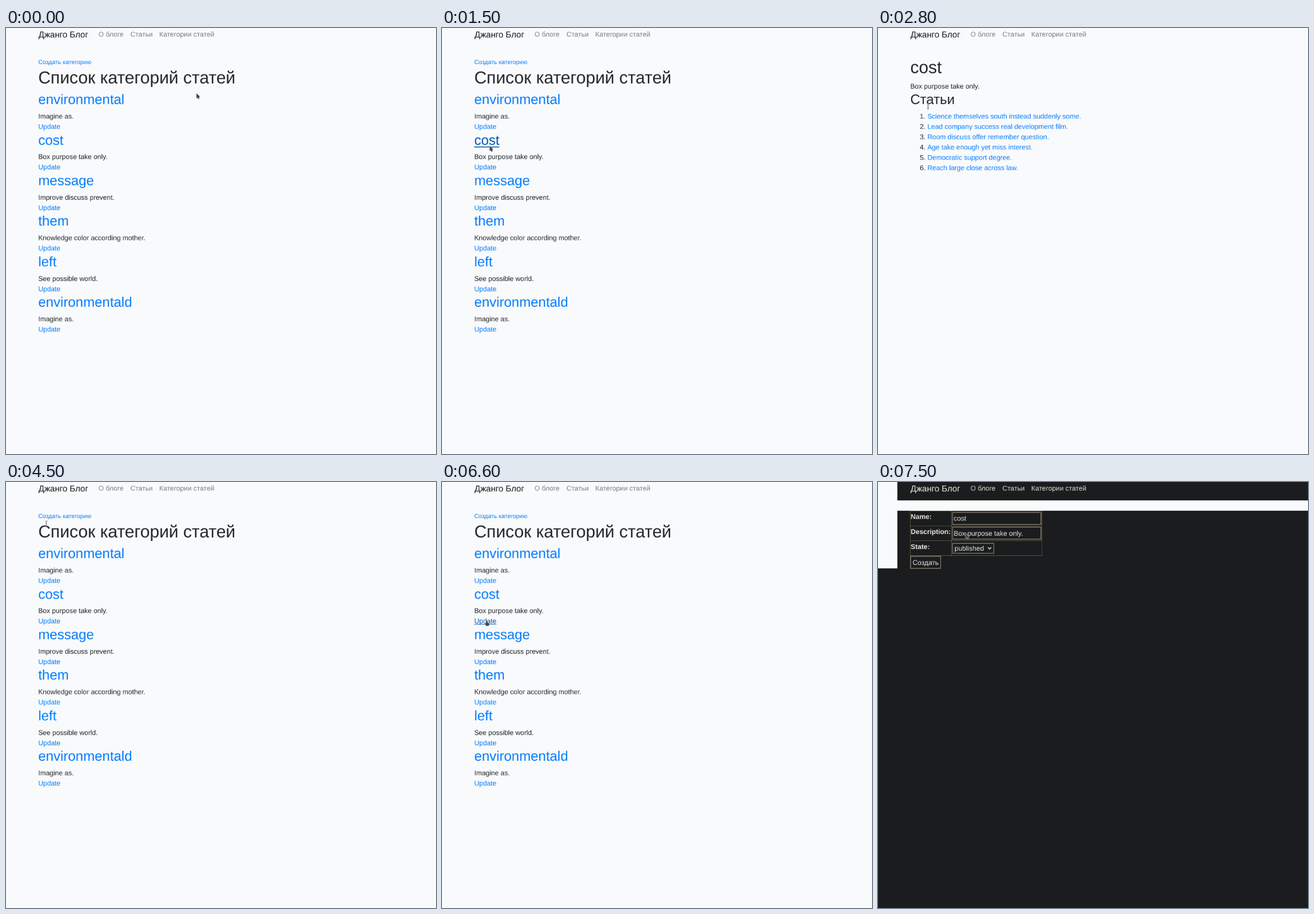
An HTML page with a canvas that plays this animation: 752x744 px, repeating every 8 s.

```html
<!DOCTYPE html>
<html lang="ru">
<head>
<meta charset="utf-8">
<title>Джанго Блог</title>
<style>
  html, body { margin: 0; width: 100%; height: 100%; overflow: hidden; background: #f9fafc; }
  canvas { display: block; }
</style>
</head>
<body>
<canvas id="stage" width="752" height="744"></canvas>
<script>
// The page is painted on a finer screen grid, then scaled down to the stage.
const SCALE = 4 / 3;
const stage = document.getElementById('stage').getContext('2d');
const screen = document.createElement('canvas');
screen.width = 1003;
screen.height = 992;
const ctx = screen.getContext('2d');

const LOOP = 8000;
const LIGHT = '#f9fafc', DARK = '#1a1c1d';
const INK = '#212529', LINK = '#007bff', HOVER = '#0056b3', PALE = '#e8e6e3';
const LEFT = 56.4, TOP = 50.25;

const categories = [
  ['environmental', 'Imagine as.'],
  ['cost', 'Box purpose take only.'],
  ['message', 'Improve discuss prevent.'],
  ['them', 'Knowledge color according mother.'],
  ['left', 'See possible world.'],
  ['environmentald', 'Imagine as.']
];
const articles = [
  'Science themselves south instead suddenly some.',
  'Lead company success real development film.',
  'Room discuss offer remember question.',
  'Age take enough yet miss interest.',
  'Democratic support degree.',
  'Reach large close across law.'
];

// start time, page, cursor, x, y, hovered link
const steps = [
  [0, 'list', 'arrow', 333.3, 114],
  [600, 'list', 'arrow', 170, 166],
  [700, 'list', 'hand', 85, 206.5, 'cost'],
  [1300, 'list', 'hand', 84.5, 206, 'cost'],
  [1400, 'list', 'arrow', 84, 206, 'cost'],
  [1500, 'list', 'arrow', 83.6, 206, 'cost'],
  [1800, 'detail', 'arrow', 83.6, 206],
  [2000, 'detail', 'beam', 87, 212],
  [2200, 'detail', 'beam', 87, 211],
  [2300, 'detail', 'beam', 87, 205],
  [2400, 'detail', 'hand', 87, 190, articles[2]],
  [2500, 'detail', 'beam', 87, 179],
  [2600, 'detail', 'beam', 87, 146],
  [2700, 'detail', 'beam', 87, 132],
  [2800, 'detail', 'beam', 87.5, 137],
  [4500, 'list', 'beam', 70.5, 73],
  [4900, 'list', 'arrow', 145.2, 178.5],
  [5300, 'list', 'beam', 88, 200.5],
  [5800, 'list', 'arrow', 70.4, 209.3],
  [6300, 'list', 'arrow', 77.5, 242, 'update'],
  [6600, 'list', 'hand', 77, 242, 'update'],
  [6900, 'form', 'arrow', 78, 242],
  [7500, 'form', 'arrow', 153.4, 89.3]
];

const snap = v => Math.round(v * SCALE) / SCALE;

function rect(x, y, w, h, color) {
  ctx.fillStyle = color;
  ctx.fillRect(snap(x), snap(y), snap(x + w) - snap(x), snap(h));
}

// Text placed by the middle of its line box; returns the baseline
function text(str, x, mid, size, color, weight = 'normal') {
  const base = snap(mid + size * 0.3465);
  ctx.font = `${weight} ${size}px "Liberation Sans", Arial, sans-serif`;
  ctx.fillStyle = color;
  ctx.fillText(str, x, base);
  return base;
}

function link(str, x, mid, size, hovered) {
  const base = text(str, x, mid, size, hovered ? HOVER : LINK);
  if (hovered) {
    rect(x, base + size * 0.115, ctx.measureText(str).width, size * 0.07, HOVER);
  }
}

function navbar(brand, item) {
  text('Джанго Блог', 56.9, 11.3, 15, brand);
  text('О блоге', 161.9, 11.1, 12, item);
  text('Статьи', 217.6, 11.1, 12, item);
  text('Категории статей', 268.2, 11.1, 12, item);
}

function lightPage() {
  rect(0, 0, 753, 744, LIGHT);
  navbar('#17181a', '#7d7d7e');
}

function listPage(hover) {
  lightPage();
  link('Создать категорию', LEFT, TOP + 9.2, 10.5, false);
  text('Список категорий статей', LEFT, TOP + 36, 30, INK);
  categories.forEach(([name, note], i) => {
    const y = TOP + 60 + i * 70.8;
    link(name, LEFT, y + 14.4, 24, hover === name);
    text(note, LEFT, y + 43.8, 12, INK);
    link('Update', LEFT, y + 61.8, 12, hover === 'update' && i === 1);
  });
}

function detailPage(hover) {
  lightPage();
  text('cost', LEFT, TOP + 18, 30, INK);
  text('Box purpose take only.', LEFT, TOP + 51, 12, INK);
  text('Статьи', LEFT, TOP + 74.4, 24, INK);
  articles.forEach((title, i) => {
    const y = TOP + 103.8 + i * 18;
    text(`${i + 1}.`, LEFT + 16.7, y, 12, INK);
    link(title, LEFT + 30, y, 12, hover === title);
  });
}

function field(x, y, w, h) {
  ctx.lineWidth = 1.5;
  ctx.strokeStyle = '#7d7466';
  ctx.strokeRect(snap(x) + 0.75, snap(y) + 0.75, snap(w) - 1.5, snap(h) - 1.5);
}

function formPage() {
  rect(0, 0, 753, 744, DARK);
  rect(0, 0, 34, 151, LIGHT);
  rect(34, 32, 719, 18, LIGHT);
  navbar(PALE, '#dcdad7');

  const grid = '#625e49';
  for (const y of [50.3, 76.3, 102.3, 128.3]) rect(56.2, y, 231, 0.75, grid);
  for (const x of [56.2, 128.2, 286.3]) rect(x, 50.3, 0.75, 78.5, grid);
  ['Name:', 'Description:', 'State:'].forEach((label, i) =>
    text(label, 57.2, 60.6 + i * 26, 12, PALE, 'bold'));

  field(129.5, 52.3, 156, 22.4);
  text('cost', 132.4, 63.6, 12, PALE);
  field(129.5, 78.3, 156, 22.4);
  text('Box purpose take only.', 132.4, 89.6, 12, PALE);
  field(129.7, 106.3, 73.8, 18.7);
  text('published', 133.9, 115.6, 12, PALE);
  ctx.beginPath();
  ctx.moveTo(192.2, 114.2);
  ctx.lineTo(195.2, 117.2);
  ctx.lineTo(198.2, 114.2);
  ctx.strokeStyle = PALE;
  ctx.lineWidth = 1.4;
  ctx.stroke();
  field(56.3, 129, 54.3, 22.3);
  text('Создать', 60.6, 140.3, 12, PALE);
}

const cursors = {
  arrow() {
    ctx.beginPath();
    ctx.moveTo(0, 0.3);
    ctx.lineTo(0, 8.6);
    ctx.lineTo(1.8, 7.6);
    ctx.lineTo(3.3, 10);
    ctx.lineTo(4.7, 9.2);
    ctx.lineTo(3.8, 6.8);
    ctx.lineTo(5.6, 5.9);
    ctx.closePath();
    ctx.strokeStyle = '#c4c4c4';
    ctx.lineWidth = 1.1;
    ctx.stroke();
    ctx.fillStyle = '#404143';
    ctx.fill();
  },
  hand() {
    ctx.beginPath();
    ctx.roundRect(0, 0, 2, 7, 1);
    ctx.roundRect(-0.8, 3.8, 6.2, 5.4, 1.6);
    ctx.moveTo(-2, 4.6);
    ctx.lineTo(0, 5);
    ctx.lineTo(1, 8.8);
    ctx.closePath();
    ctx.strokeStyle = '#d5d8dc';
    ctx.lineWidth = 0.8;
    ctx.stroke();
    ctx.fillStyle = '#434548';
    ctx.fill();
  },
  beam() {
    rect(-0.4, -4.5, 0.8, 9, '#77797c');
    rect(-2.3, -5, 4.6, 0.9, '#8b8d90');
    rect(-2.3, 4.1, 4.6, 0.9, '#8b8d90');
  }
};

const pages = { list: listPage, detail: detailPage, form: formPage };

function draw(now) {
  const t = now % LOOP;
  const [, page, cursor, x, y, hover] = steps.findLast(step => step[0] <= t);
  ctx.setTransform(SCALE, 0, 0, SCALE, 0, 0);
  ctx.textRendering = 'geometricPrecision';
  pages[page](hover);
  ctx.translate(x, y);
  cursors[cursor]();

  stage.imageSmoothingQuality = 'high';
  stage.drawImage(screen, 0, 0, screen.width / SCALE, screen.height / SCALE);
}

const start = performance.now();
function tick() {
  draw(performance.now() - start);
  requestAnimationFrame(tick);
}
tick();
</script>
</body>
</html>
```
